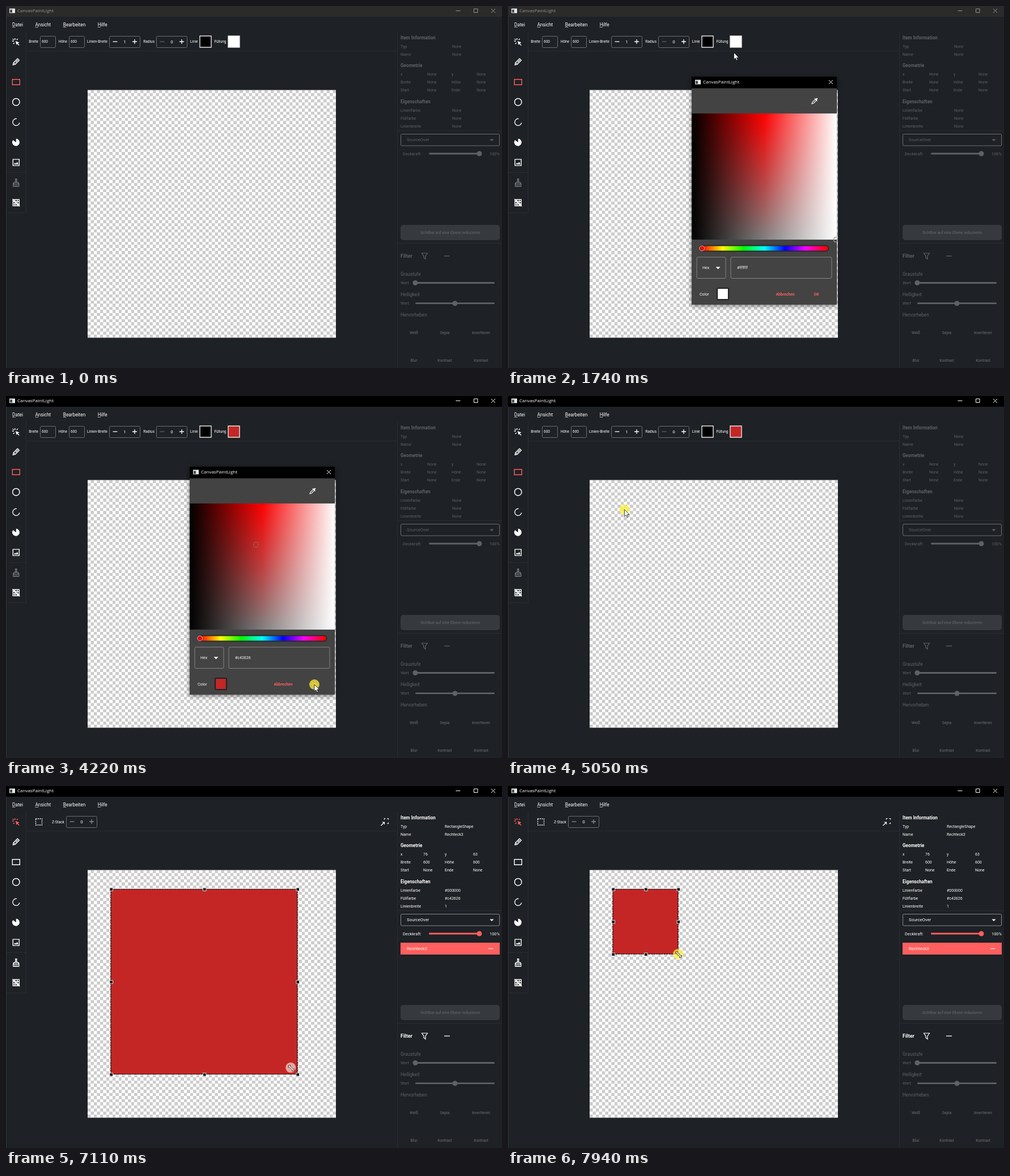
An HTML page with a canvas for the animation above (8 s loop, 875 px wide and 640 px high).

```html
<!DOCTYPE html>
<html lang="de">
<head>
<meta charset="utf-8">
<title>CanvasPaintLight</title>
<style>
html, body { margin: 0; height: 100%; overflow: hidden; background: #1e2125; }
canvas { display: block; }
</style>
</head>
<body>
<canvas id="stage" width="875" height="640"></canvas>
<script>
const LOOP = 8000, CLICK = 140, LAG = 90;
const WHITE = '#fff', DIM = '#5f6164', EDGE = '#6d6f72', ACCENT = '#ff5f5f', FILL = '#c42626', BG = '#1e2125';
const g = document.getElementById('stage').getContext('2d');

// The drawing area shows 800 units at this zoom
const ZOOM = .5475, AREA = { x: 144, y: 148.5, size: 800 * ZOOM };
const DIALOG = { x: 324, y: 125, w: 256, h: 403 };

// Drawing helpers
function text(s, x, y, size = 7, color = WHITE, weight = 400, align = 'left', font = 'Roboto') {
  g.font = `${weight} ${size}px ${font}, sans-serif`;
  g.textAlign = align;
  g.fillStyle = color;
  g.fillText(s, x, y + size * .355);
  return g.measureText(s).width;
}
function rect(x, y, w, h, color) {
  g.fillStyle = color;
  g.fillRect(x, y, w, h);
}
function box(x, y, w, h, stroke, fill, r = 2, lw = 1) {
  g.beginPath();
  g.roundRect(x, y, w, h, r);
  if (fill) { g.fillStyle = fill; g.fill(); }
  if (stroke) { g.strokeStyle = stroke; g.lineWidth = lw; g.stroke(); }
}
function disc(x, y, r, fill, stroke, lw = 1) {
  box(x - r, y - r, 2 * r, 2 * r, stroke, fill, r, lw);
}
function icon(x, y, d, stroke, fill, lw = 1.3) {
  const path = new Path2D(d);
  g.save();
  g.translate(x, y);
  if (fill) { g.fillStyle = fill; g.fill(path); }
  if (stroke) { g.strokeStyle = stroke; g.lineWidth = lw; g.stroke(path); }
  g.restore();
}
function dashed(dash, paint) {
  g.setLineDash(dash);
  paint();
  g.setLineDash([]);
}
function gradient(x0, x1, colors) {
  const grad = g.createLinearGradient(x0, 0, x1, 0);
  colors.forEach((c, i) => grad.addColorStop(i / (colors.length - 1), c));
  return grad;
}
const hline = (x, y, w) => rect(x, y, w, 1, '#292c30');
const vline = (x, y, h) => rect(x, y, 1, h, '#292c30');

// Pointer: eased moves between the places it clicks; a bend bows the path sideways
const ENTRY = [668, 546], SWATCH = [400, 66], COLOR = [441, 263], OK = [544, 510];
const START = [185, 182], END = [514, 509.5], TOOL = [20, 66], SMALL = [300, 297];
const moves = [
  { from: 270, to: 1000, at: SWATCH, bend: -200 },
  { from: 1540, to: 2680, at: COLOR, bend: -75 },
  { from: 2820, to: 4150, at: OK, bend: -20 },
  { from: 4290, to: 5180, at: START },
  { from: 5180, to: 5560, at: END, drag: true },
  { from: 5600, to: 5850, at: TOOL },
  { from: 5990, to: 6660, at: END },
  { from: 7030, to: 7600, at: SMALL, drag: true }
];
const [toSwatch, toColor, toOk, toStart, drawing, toTool, toHandle, resizing] = moves;
const pickTime = toColor.to, acceptTime = toOk.to + 70, drawnTime = drawing.to + 30;
const selectTime = toTool.to + 20, handleTime = 6500;

function pointer(t) {
  let [x, y] = ENTRY;
  for (const { from, to, at, bend = 0 } of moves) {
    if (t < from) break;
    const k = Math.min(1, (t - from) / (to - from));
    const s = k * k * (3 - 2 * k);
    x += (at[0] - x) * s + bend * Math.sin(Math.PI * s) ** 2;
    y += (at[1] - y) * s;
  }
  return [x, y];
}
// The button is down throughout a drag and just before each departure
function pressed(t) {
  const i = moves.findLastIndex(m => t >= m.from);
  const leave = i + 1 < moves.length ? moves[i + 1].from : LOOP;
  return i >= 0 && (moves[i].drag || t >= leave - CLICK);
}

const checker = (() => {
  const tile = document.createElement('canvas');
  tile.width = tile.height = 20;
  const p = tile.getContext('2d');
  p.fillStyle = WHITE;
  p.fillRect(0, 0, 20, 20);
  p.fillStyle = '#ccc';
  p.fillRect(10, 0, 10, 10);
  p.fillRect(0, 10, 10, 10);
  const pattern = g.createPattern(tile, 'repeat');
  pattern.setTransform(new DOMMatrix([ZOOM, 0, 0, ZOOM, AREA.x, AREA.y]));
  return pattern;
})();

const CROSS = 'M-3.5-3.5l7 7M3.5-3.5l-7 7', MINUS = 'M-4 0h8', PLUS = MINUS + 'M0-4v8';

function caption(x, y, color) {
  rect(x, y - 4, 10, 8, '#e8e8e8');
  rect(x + 1, y - 2, 4, 5, '#3c4a52');
  text('CanvasPaintLight', x + 14, y, 8, color, 400, 'left', 'Open Sans');
}

function titleBar(active) {
  const color = active ? WHITE : '#969696';
  rect(0, 0, 875, 19, active ? '#000' : '#2b2b2b');
  caption(6, 8.5, color);
  [MINUS, 'M-3-3.5h6.5v6.5h-6.5z', CROSS].forEach((d, i) => icon(797.5 + 31 * i, 8.5, d, color, null, 1));
}

function menu() {
  let x = 11;
  for (const s of ['Datei', 'Ansicht', 'Bearbeiten', 'Hilfe']) {
    const w = text(s, x, 33, 8.25);
    rect(x, 37, 5.5, .8, '#ccc');
    x += w + 21.5;
  }
}

// Tool icons from top to bottom: outline, solid part
const tools = [
  ['M-2-6v3M-6-5l2 2M-7-1h3M-5 4l2-2M3-5l-2 2', 'M-1-1L6 1.5 3 3 6 6 5 7 2 4 .8 6z'],
  ['M-5.5 5.5l1-4 7-7 3 3-7 7zM-4 2l2 2M-1 1l4-4'],
  ['M-6.5-4.5h13v9.5h-13z'],
  ['M-6.2 0a6.2 6.2 0 1 1 0 .01z'],
  ['M1-6A6 6 0 1 0 6 1'],
  ['', 'M0-6.5A6.5 6.5 0 1 1-5.5-4L0 0z'],
  ['M-5.5-5.5h11v11h-11z', 'M-4 3.5l2.2-3 1.6 1.8L2-1 4 3.5z'],
  ['M-1-6.5h2v6h-2zM-5 2.5q0-3 3-3h4q3 0 3 3zM-5 2.5v4h10v-4M-2 6.5v-2M1.5 6.5v-2'],
  ['M-5.5-5.5h11v11h-11zM-2-5.5v11M2-5.5v11M-5.5-2h11M-5.5 2h11M-6.5-6.5l13 13']
];
function toolbox(selecting, drawn) {
  const current = selecting ? 0 : 2, broom = 7;
  tools.forEach(([outline, solid], i) => {
    const color = i === current ? ACCENT : i === broom && !drawn ? '#77797b' : WHITE;
    const y = 63 + 35.6 * i;
    icon(17.8, y, outline, color, null, 1.4);
    if (solid) icon(17.8, y, solid, null, color);
  });
}

function spinner(x, value, minus, plus) {
  box(x, 53.5, 54, 20, EDGE);
  icon(x + 10, 63, MINUS, minus);
  text(value, x + 27, 63, 8, WHITE, 400, 'center');
  icon(x + 44.5, 63, PLUS, plus);
}
const field = x => { box(x, 53.5, 27, 20, EDGE); text('600', x + 2.5, 63, 6.5); };
const swatch = (x, color) => box(x, 53, 20, 20, '#e4e8e4', color, 0, 1.4);

function shapeBar(fill) {
  const labelled = (s, x, widget, ...args) => {
    text(s, x - 3.5, 63, 6.5, WHITE, 400, 'right');
    widget(x, ...args);
  };
  labelled('Breite', 60.5, field);
  labelled('Höhe', 111.5, field);
  labelled('Linien-Breite', 182.5, spinner, '1', WHITE, WHITE);
  labelled('Radius', 265.5, spinner, '0', DIM, WHITE);
  labelled('Linie', 342, swatch, '#000');
  labelled('Füllung', 392, swatch, fill);
}

function selectBar() {
  dashed([2, 1.5], () => icon(58, 63.5, 'M-5.5-5.5h11v11h-11z', WHITE));
  text('Z-Stack', 81, 63.5, 6.5);
  spinner(106.5, '0', '#8a8c8e', '#8a8c8e');
  icon(668.5, 63.5, 'M-7 6.5L-1 .5M-5 .5h4v4M1-6h-2v2M4-6h2v2M6 1v2h-2', WHITE, null, 1.2);
}

function slider(x0, x1, y, value, color) {
  box(x0, y - 1.4, x1 - x0, 2.8, null, color, 1.4);
  disc(x0 + (x1 - x0) * value, y, 4.5, color);
}

function panel(on) {
  const color = on ? WHITE : DIM, wide = on ? 774 : 787, left = 696;
  const section = (title, y, columns, rows) => {
    text(title, left, y, 8.2, color, 700);
    rows.forEach((row, i) => row.forEach((s, j) => {
      const value = j % 2 && !on ? 'None' : s;
      text(value, columns[j], y + 15.5 + 13.8 * i, 7, color);
    }));
  };
  section('Item Information', 56.5, [left, wide], [['Typ', 'RectangleShape'], ['Name', 'Rechteck3']]);
  section('Geometrie', 105.5, on ? [left, 736, 774, 824] : [left, 743, 786, 830],
    [['x', '76', 'y', '63'], ['Breite', '600', 'Höhe', '600'], ['Start', 'None', 'Ende', 'None']]);
  section('Eigenschaften', 169, [left, wide], [['Linienfarbe', '#000000'], ['Füllfarbe', FILL], ['Linienbreite', '1']]);

  box(left + .5, 226.5, 174, 20.5, on ? '#8a8c8e' : EDGE);
  text('SourceOver', 707, 236.5, 7.7, color);
  icon(857, 237, 'M-3.5-1.5h7L0 2z', null, color);
  text('Deckkraft:', 700, 261.5, 7.3, color);
  slider(746, 835, 261, 1, on ? ACCENT : DIM);
  text('100%', 853, 261.5, 7.4, color);
  if (on) {
    rect(left, 277, 175, 21, ACCENT);
    text('Rechteck3', 707, 287.5, 7.7);
    icon(855, 287.5, MINUS, WHITE, null, 1.2);
  }
  box(left, 387, 175, 27, null, '#36393d', 5);
  text('Sichtbar auf eine Ebene reduzieren', 783.5, 400.5, 6.8, DIM, 500, 'center');

  text('Filter', left, 442, 9, color, 700);
  icon(738.5, 442, 'M-5-5h10L1.5 0v5.5L-1.5 3V0z', color, null, 1.2);
  icon(778, 442, 'M-5 0h10', color);
  ['Graustufe', 'Helligkeit', 'Hervorheben'].forEach((s, i) => {
    const y = 474 + 36.2 * i;
    text(s, left, y, 8.2, DIM);
    if (i === 2) return;
    text('Wert', left, y + 15.5, 7.2, DIM);
    slider(722, 862, y + 15.5, i / 2, DIM);
  });
  [['Weiß', 'Sepia', 'Invertieren'], ['Blur', 'Kontrast', 'Kontrast']].forEach((row, i) =>
    row.forEach((s, j) => text(s, [719.5, 774, 838][j], 578 + 49 * i, 6.7, DIM, 500, 'center')));
}

function dialog(picked, alpha) {
  const { x, y, w, h } = DIALOG, top = y + 65, rows = 223;
  g.save();
  g.globalAlpha = alpha;
  g.shadowColor = 'rgba(0,0,0,.55)';
  g.shadowBlur = 8;
  g.shadowOffsetY = 2;
  rect(x, y, w, h, '#434343');
  g.shadowColor = 'transparent';
  rect(x, y, w, 20.5, '#000');
  caption(x + 6, 134.5, WHITE);
  icon(569.5, 134.5, CROSS, WHITE, null, 1);
  icon(541, 168, 'M-5 5l1-3 5-5 2 2-5 5z', WHITE, null, 1.1);
  icon(541, 168, 'M-.5-4l1-1 1.3 1.3L4-5.5 5.5-4 3.5-1.8 5-.5 4 .5z', null, WHITE);

  // Lightness runs right, saturation falls downwards
  rect(x, top, w, rows, gradient(x, x + w, ['#000', '#f00', WHITE]));
  const grays = gradient(x, x + w, ['#000', WHITE]);
  for (let i = 0; i < rows; i++) {
    g.globalAlpha = alpha * i / (rows - 1);
    rect(x, top + i, w, 1, grays);
  }
  g.globalAlpha = alpha;
  g.save();
  g.beginPath();
  g.rect(x, top, w, rows + 7);
  g.clip();
  if (picked) disc(...COLOR, 4.5, null, '#8a7068');
  else disc(x + w - 1, top + rows, 4.5, null, '#999', 1.5);
  g.restore();

  const hues = Array.from({ length: 13 }, (_, i) => `hsl(${i * 30} 100% 50%)`);
  box(337.5, 423.5, 228, 10, '#2b2b2b', gradient(342, 562, hues), 5, 2);
  disc(342, 428.5, 4.5, '#e01010', '#bbb');
  box(333, 444, 51, 37.5, '#858585');
  text('Hex', 343, 463);
  icon(370.5, 463, 'M-4-1.8h8L0 2.2z', null, WHITE);
  box(393, 444, 178, 37.5, '#858585');
  text(picked ? FILL : '#ffffff', 404, 463);
  text('Color', 338, 509.5);
  box(369, 499, 20, 20, '#222', picked ? FILL : WHITE, 1, 2.2);
  text('Abbrechen', 489, 509.5, 6.8, ACCENT, 700, 'center');
  text('OK', 544, 509.5, 6.8, ACCENT, 700, 'center');
  g.restore();
}

function shape(x, y, selected) {
  const [x0, y0] = START, w = x - x0, h = y - y0;
  if (w < 1 || h < 1) return;
  box(x0, y0 + .5, w, h - .5, '#3a0808', FILL, 0, .8);
  if (!selected) return;
  dashed([2.5, 2], () => box(x0, y0 + .5, w, h - .5, '#111', null, 0));
  for (let i = 0; i < 3; i++)
    for (let j = 0; j < 3; j++)
      if (i !== 1 || j !== 1) box(x0 - 2 + w * i / 2, y0 - 2 + h * j / 2, 5.5, 5.5, '#ddd', '#111', 0);
}

function drawPointer(t) {
  const [x, y] = pointer(t);
  const pale = t >= resizing.from && t < resizing.from + LAG + 60;
  if (pressed(t)) disc(x, y, 9, pale ? 'rgba(255,235,225,.65)' : 'rgba(252,240,60,.75)');
  if (t >= toHandle.to - 20) icon(x + 1, y + 1, 'M-5-5h4l-1.2 1.2 6 6L5 1v4H1l1.2-1.2-6-6L-5-1z', '#111', WHITE, .8);
  else icon(x, y, 'M0 0V12.4L2.8 9.8 4.7 14 6.6 13.2 4.8 9H8.6z', '#111', WHITE, .8);
}

function draw(t) {
  const selecting = t >= selectTime, drawn = t >= drawnTime, accepted = t >= acceptTime;
  const opened = toColor.from, closed = acceptTime + 120;
  rect(0, 0, 875, 640, BG);
  rect(0, 19, 1, 621, '#2c3a40');
  titleBar(t >= opened - CLICK && t < opened || accepted);
  menu();
  vline(35, 46, 319);
  vline(690, 46, 594);
  hline(0, 294, 35);
  hline(0, 365, 36);
  hline(36, 79, 655);
  hline(691, 220, 184);
  hline(691, 419, 184);
  toolbox(selecting, drawn);
  if (selecting) selectBar();
  else shapeBar(accepted ? FILL : WHITE);
  panel(drawn);

  rect(AREA.x, AREA.y, AREA.size, AREA.size, checker);
  if (t >= drawing.from) {
    const resized = t >= resizing.from + LAG;
    shape(...pointer(resized ? t - LAG : Math.min(t, drawing.to)), t >= handleTime);
  }
  if (t >= opened && t < closed)
    dialog(t >= pickTime, Math.min(1, (t - opened + 80) / 150, (closed - t) / 120));
  if (t >= toSwatch.from) drawPointer(t);
}

function frame(now) {
  draw(now % LOOP);
  requestAnimationFrame(frame);
}
requestAnimationFrame(frame);
</script>
</body>
</html>
```
